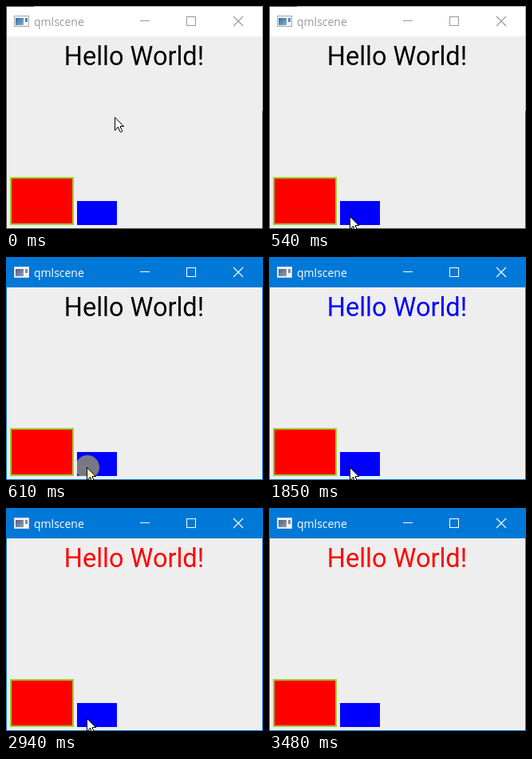
An HTML page with a canvas for the animation above (3710 ms loop, 322 by 279 pixels).

```html
<!DOCTYPE html>
<html lang="en">
<head>
<meta charset="utf-8">
<title>Focus demo</title>
<style>
  html, body { margin: 0; width: 100%; height: 100%; overflow: hidden; }
  canvas { display: block; }
</style>
</head>
<body>
<canvas id="stage" width="322" height="279"></canvas>
<script>
const ctx = document.getElementById('stage').getContext('2d');
const LOOP = 3710;
const ACTIVATE = 610, BLUE_FOCUS = 690, RED_FOCUS = 1850, RED_TEXT = 2940, LEAVE = 3480;
const ACCENT = '#0078d7', FOCUS = 'yellowgreen';

// Pointer tip positions: [start time, x, y]
const POINTER = [
  [0, 136, 139], [70, 134, 149], [150, 123, 176], [230, 105, 214],
  [310, 88, 244], [390, 79, 259], [460, 90, 265], [540, 101, 263],
  [3320, 107, 266], [3400, 115, 273]
];

function box(x, y, w, h, color) {
  ctx.fillStyle = color;
  ctx.fillRect(x, y, w, h);
}

function frame(x, y, w, h, color, line = 1) {
  ctx.strokeStyle = color;
  ctx.lineWidth = line;
  ctx.strokeRect(x + line / 2, y + line / 2, w - line, h - line);
}

function label(text, x, y, font, color, align = 'left') {
  ctx.font = font;
  ctx.textAlign = align;
  ctx.fillStyle = color;
  ctx.fillText(text, x, y);
}

function windowEdge(active) {
  box(0, 0, 322, 279, active ? ACCENT : '#4c4c4c');
  if (active) return;
  box(35, 0, 287, 1, '#aaa');
  box(321, 0, 1, 131, '#aaa');
}

function windowIcon(active) {
  box(10, 12, 19, 14, active ? '#d4d8dc' : '#a4a8ac');
  box(11, 13, 17, 12, '#f4f4f4');
  const screen = ctx.createLinearGradient(12, 15, 21, 24);
  screen.addColorStop(0, active ? '#4f5f86' : '#2f68c0');
  screen.addColorStop(1, active ? '#8f9cb0' : '#7fb0b8');
  box(12, 15, 10, 9, screen);
  box(24, 15, 3, 5, active ? '#7c8cac' : '#5588cc');
}

function titleBar(active) {
  const ink = active ? '#fff' : '#999';
  box(1, 1, 320, 37, active ? ACCENT : '#fff');
  windowIcon(active);
  label('qmlscene', 35, 25, '14px "Open Sans", sans-serif', ink);
  box(168, 18, 12, 1, ink);
  frame(226, 13, 12, 12, ink);
  ctx.lineWidth = 1.1;
  ctx.stroke(new Path2D('M285 13L297 25M297 13L285 25'));
}

function tile(x, y, w, h, color, focused) {
  box(x, y, w, h, color);
  if (focused) frame(x, y, w, h, FOCUS, 2);
}

// One pixel row of the arrow: black ends around a filled middle
function arrowRow(x, y, width, fill) {
  box(x, y, width, 1, '#000');
  if (width > 2) box(x + 1, y, width - 2, 1, fill);
}

function arrow(x, y, fill) {
  for (let row = 0; row < 11; row++) arrowRow(x, y + row, row + 1, fill);
  box(x + 7, y + 11, 5, 1, '#000');
  arrowRow(x, y + 11, 8, fill);
  for (let row = 12; row < 17; row++) arrowRow(x, y + row, 17 - row, fill);
  for (let row = 12; row < 18; row++) arrowRow(x + (row >> 1) - 2, y + row, 4, fill);
  box(x + 7, y + 18, 2, 1, '#000');
}

function clickMark() {
  ctx.save();
  ctx.beginPath();
  ctx.arc(102, 263, 15, 0, Math.PI * 2);
  ctx.clip();
  box(89, 244, 50, 30, 'rgba(255, 255, 0, .47)');
  ctx.restore();
}

function draw(t) {
  const active = t >= ACTIVATE;
  const clicking = active && t < BLUE_FOCUS;
  const blueFocused = t >= BLUE_FOCUS && t < RED_FOCUS;
  const textColor = t >= RED_TEXT ? '#f00' : t >= BLUE_FOCUS ? '#00f' : '#000';

  windowEdge(active);
  box(1, 38, 320, 240, '#eee');
  titleBar(active);
  label('Hello World!', 160.4, 74, '32.5px Roboto, sans-serif', textColor, 'center');
  tile(5, 214, 80, 60, '#f00', !blueFocused);
  tile(89, 244, 50, 30, '#00f', blueFocused);
  if (clicking) clickMark();
  if (t < LEAVE) {
    const [, x, y] = POINTER.findLast(step => step[0] <= t);
    arrow(x, y, clicking ? '#ffffb0' : '#fff');
  }
}

function tick() {
  draw(performance.now() % LOOP);
  requestAnimationFrame(tick);
}
tick();
</script>
</body>
</html>
```
